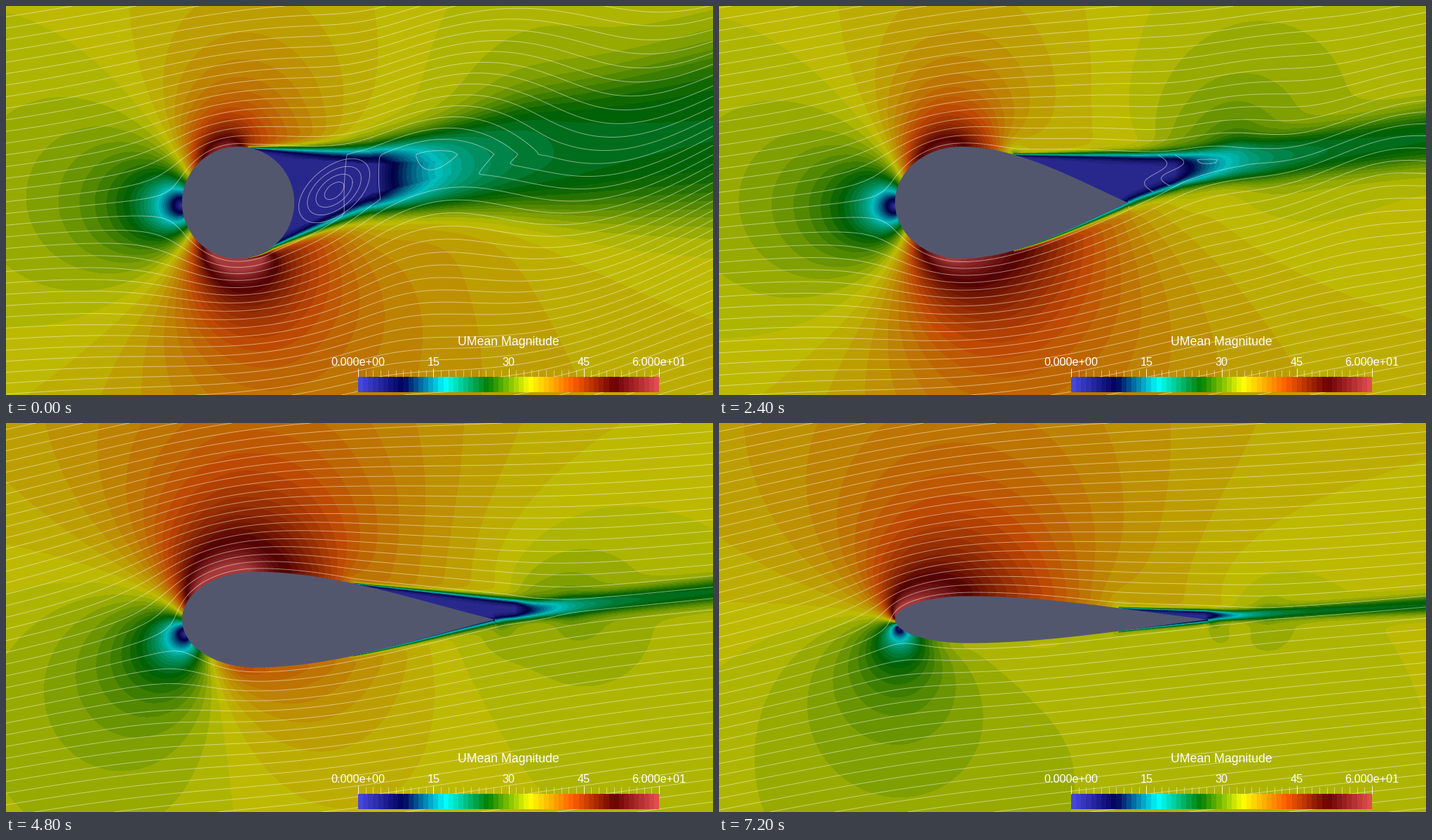
Recreate the animation shown at these times as a matplotlib script. Size 1008x556 px, loop 8000 ms.

```python
import numpy as np
import matplotlib.pyplot as plt
from matplotlib.animation import ArtistAnimation
from matplotlib.patches import Rectangle

W, H, DPI = 1008, 556, 64
PX = 72 / DPI
STEPS, HOLD = 10, 800
NOSE, MID = 251, 281
SPEED, ALPHA = 34.9, np.radians(8)
BANDS, VMAX = 60, 60
NODES, SPACING = 210, 15.5

GX, GY = np.arange(0, W + 1, 2.0), np.arange(0, H + 1, 2.0)[:, None]
SX, SY = GX[::2], GY[::2]


def decay(k, start, end, rate):
    return end + (start - end) * np.exp(-k / rate)


class Body:
    """A circle that stretches into a foil, then gets thinner."""

    def __init__(self, k):
        self.round = k == 0
        self.tip = 411 + 57.2 * min(k, 5)
        self.b = 80 - 11.6 * max(k - 5, 0)
        self.a = 80 + 24 * min(k, 5) / 5

    def half(self, x):
        a, b = self.a, self.b
        length = self.tip - NOSE - a
        front = b * np.sqrt(np.clip(1 - ((x - NOSE - a) / a) ** 2, 0, 1))
        u = np.clip((x - NOSE - a) / length, 0, 1)
        if self.round:
            rear = b * np.sqrt(1 - u * u)
        else:
            slope = b * (1.1 + .8 * (133 / length) ** 2)
            rear = b * (2 * u**3 - 3 * u**2 + 1) - slope * (u**3 - u**2)
        h = np.where(x < NOSE + a, front, rear)
        return np.where((x < NOSE) | (x > self.tip), 0, h)

    def points(self):
        x = NOSE + (self.tip - NOSE) * (1 - np.cos(np.linspace(0, np.pi, 200))) / 2
        h = self.half(x)
        return np.append(x, x[::-1]), np.append(MID - h, (MID + h)[::-1])


class Wake:
    """Separated region behind the body and its trail to the right edge."""

    def __init__(self, k, body):
        self.body = body
        self.sep_top = 345 + 25 * k
        self.sep_bot = body.tip - decay(k, 35, 0, 1.5)
        self.close = body.tip + decay(k, 110, 0, 9)
        self.close_y = np.interp(k, [0, 3, 6, 9], [247, 233, 267, 275])
        self.close_half = decay(k, 39, 0, 4.5)
        self.end_y = np.interp(k, [0, 3, 6, 9], [178, 188, 241, 260])
        self.end_half = decay(k, 105, 8, 2.2)
        self.shear = decay(k, 57, 5, 2.5)
        self.recover = self.close + 5 - 5.5 * k
        self.length = 82 - 4 * k
        self.tail = self.close + decay(k, 240, 40, 2)

    def edge(self, x, sep, side):
        body = self.body
        start = MID + side * body.half(sep)
        line = np.interp(x, [sep, self.close, W],
                         [start, self.close_y + side * self.close_half,
                          self.end_y + side * self.end_half])
        layer = 3 * np.clip((x - self.sep_top) / (body.tip - self.sep_top), 0, 1)
        skin = body.half(x) + layer
        off = side * (line - MID)
        off = np.where(x < sep, skin, np.where(x < body.tip, np.maximum(off, skin), off))
        return MID + side * off

    def edges(self, x):
        return self.edge(x, self.sep_top, -1), self.edge(x, self.sep_bot, 1)

    def outline(self):
        """Closed shape around which the outer flow is solved."""
        x = NOSE + (self.tail - NOSE) * (1 - np.cos(np.linspace(0, np.pi, 500))) / 2
        top, bot = self.edges(x)
        mid, half = (top + bot) / 2, (bot - top) / 2
        half = np.where(x > self.close, np.minimum(half, self.close_half), half)
        u = np.clip((x - self.body.tip) / (self.tail - self.body.tip), 0, 1)
        half = half * (1 - u * u)
        return x, mid - half, mid + half

    def slow_down(self, speed):
        x, y = np.arange(W) + .5, (np.arange(H) + .5)[:, None]
        top, bot = self.edges(x)
        start = self.sep_top
        d = 1.5 + self.shear * np.clip((x - start) / (W - start), 0, 1)
        half = np.maximum((bot - top) / 2, 1)
        g = .5 * (np.tanh((y - top) / d) - np.tanh((y - bot) / d)) / np.tanh(half / d)
        g = np.where(x < start, 0, np.clip(g, 0, 1))
        fade = np.exp(-np.clip(x - self.recover, 0, None) / self.length)
        return speed * (1 - g) + (25 - 22.5 * fade) * g


def solve(k, x, top, bot):
    """Vortex strengths that make the outline a streamline."""
    ox = np.concatenate([x[::-1], x[1:]])
    oy = np.concatenate([top[::-1], bot[1:]])
    arc = np.concatenate([[0], np.cumsum(np.hypot(np.diff(ox), np.diff(oy)))])
    s = np.arange(NODES) * arc[-1] / NODES
    px, py = np.interp(s, arc, ox), np.interp(s, arc, oy)

    # Vortices sit slightly inside the outline
    tx, ty = (np.roll(v, -1) - np.roll(v, 1) for v in (px, py))
    norm = np.hypot(tx, ty) + 1e-9
    thick = np.interp(px, x, (bot - top) / 2)
    depth = np.where(px < 340, 2, np.minimum(2, .4 * thick))
    vx, vy = px + ty / norm * depth, py - tx / norm * depth
    core = (.18 * s[1]) ** 2

    m = np.zeros((NODES + 1, NODES + 1))
    r2 = (px[:, None] - vx) ** 2 + (py[:, None] - vy) ** 2 + core
    m[:NODES, :NODES] = .5 * np.log(r2 / 1e4)
    m[:NODES, NODES] = -1
    # Bluff shapes fix the front stagnation point, slim ones leave the tail smoothly
    if k <= 5:
        near = np.flatnonzero(px < 300)
        pos = np.interp(np.interp(k, [0, 3, 5], [285, 286, 298]), py[near], near)
        i = int(pos)
        m[NODES, i], m[NODES, i + 1] = i + 1 - pos, pos - i
    else:
        m[NODES, 0] = 1
    rhs = np.append(-(py * np.cos(ALPHA) + px * np.sin(ALPHA)), 0)
    sol = np.linalg.lstsq(m, rhs, rcond=1e-5)[0]
    return vx, vy, sol[:NODES], sol[NODES], core


def outer_flow(k, wake):
    """Speed on the grid, and stream function on the coarser one."""
    x, top, bot = wake.outline()
    vx, vy, gamma, psi0, core = solve(k, x, top, bot)
    gx = np.full((GY.size, GX.size), np.sin(ALPHA))
    gy = np.full_like(gx, np.cos(ALPHA))
    psi = SY * np.cos(ALPHA) + SX * np.sin(ALPHA) - psi0
    for a, b, g in zip(vx, vy, gamma):
        dx, dy = GX - a, GY - b
        r2 = (dx * dx + core) + dy * dy
        psi += .5 * g * np.log(r2[::2, ::2] / 1e4)
        q = g / r2
        gx += q * dx
        gy += q * dy
    speed = SPEED * np.hypot(gx, gy)

    # Carry the surface speed a little way inside the outline
    t, b = np.interp(GX, x, top), np.interp(GX, x, bot)
    inside = (GY > t - 2) & (GY < b + 2) & (GX > NOSE - 2) & (GX < x[-1])
    speed[inside] = 0
    for _ in range(8):
        near = np.max([np.roll(speed, d, ax) for d in (-1, 1) for ax in (0, 1)], axis=0)
        speed = np.where(inside & (speed == 0), near, speed)
    return speed, psi


def upsample(s, n):
    pos = (np.arange(n) + .5) / 2
    i = pos.astype(int)
    f = (pos - i)[:, None]
    return s[i] * (1 - f) + s[i + 1] * f


def shedding(k, wake):
    """Wave that the vortex street adds to the streamlines."""
    amp = max(decay(k, 47, 0, 2.2) - 3, 0)
    crest = np.interp(k, [0, 1, 3, 5], [600, 1010, 700, 760])
    span = np.interp(k, [0, 1, 3, 5], [580, 780, 250, 200])
    grow = 1 / (1 + np.exp((wake.recover - 20 - SX) / 45))
    phase = 2 * np.pi * (SX - crest + .45 * (SY - 210)) / span
    return amp * grow * np.cos(phase) / np.cosh((SY - 215) / decay(k, 190, 20, 3))


def inner_lines(k, wake):
    """Streamlines inside the separated region."""
    if k == 0:
        t = np.linspace(0, 2 * np.pi, 80)
        for r in np.linspace(.3, 1.1, 4):
            yield 468 + 46 * r * np.cos(t), 264 + r * (36 * np.sin(t) - 21 * np.cos(t))
    elif k <= 3:
        s = np.linspace(0, 1, 60)
        for j in range(5 - k):
            x = wake.body.tip + 10 + 17 * (k - 1) + 24 * j
            top, bot = wake.edges(x)
            yield x + 14 * np.sin(2 * np.pi * s) - 8 * s, top + (bot - top) * s


def color_table():
    stops = np.array([
        [.278, .278, .859], [0, 0, .361], [0, 1, 1], [0, .502, 0],
        [1, 1, 0], [1, .38, 0], [.42, 0, 0], [.878, .302, .302]])
    at, x = np.linspace(0, 1, len(stops)), np.linspace(0, 1, BANDS)
    return np.stack([np.interp(x, at, c) for c in stops.T], axis=1)


def draw_step(k):
    body = Body(k)
    wake = Wake(k, body)
    speed, psi = outer_flow(k, wake)
    speed = wake.slow_down(upsample(upsample(speed, H).T, W).T)
    band = np.clip(speed / VMAX * BANDS, 0, BANDS - 1).astype(int)
    rgb = (colors[band] * 255 * .745).astype(np.uint8)
    image = ax.imshow(rgb, extent=(0, W, H, 0), aspect="auto",
                      interpolation="nearest", zorder=1)

    levels = (np.arange(-50, 50) + .5) * SPACING
    lines = ax.contour(SX, SY[:, 0], psi + shedding(k, wake), levels=levels,
                       colors="white", linestyles="solid",
                       linewidths=.95 * PX, alpha=.5, zorder=2)
    extra = [ax.plot(x, y, color="white", lw=.95 * PX, alpha=.5, zorder=2)[0]
             for x, y in inner_lines(k, wake)]
    shape = ax.fill(*body.points(), color=(83 / 255, 87 / 255, 110 / 255),
                    lw=0, zorder=3)
    return [image, lines, *extra, *shape]


def draw_legend():
    left, right, top, bottom = 502, 931, 530, 552
    cell = (right - left) / BANDS
    for i, c in enumerate(colors):
        ax.add_patch(Rectangle((left + i * cell, top), cell, bottom - top,
                               facecolor=c, lw=0, antialiased=False, zorder=5))
    ticks = np.linspace(left, right, 41)
    ax.vlines(ticks, 520, top, color="white", lw=.8 * PX, alpha=.6, zorder=5)
    ax.vlines(ticks[::10], 518, top, color="white", lw=PX, alpha=.8, zorder=5)
    text = dict(color="white", family="Liberation Sans", ha="center",
                va="baseline", zorder=6)
    ax.text(716.5, 485, "UMean Magnitude", fontsize=17.6 * PX, **text)
    for x, label in zip(ticks[::10], ("0.000e+00", "15", "30", "45", "6.000e+01")):
        ax.text(x, 514, label, fontsize=16.3 * PX, **text)


fig = plt.figure(figsize=(W / DPI, H / DPI), dpi=DPI)
ax = fig.add_axes([0, 0, 1, 1])
ax.set_xlim(0, W)
ax.set_ylim(H, 0)
ax.axis("off")
colors = color_table()
draw_legend()
frames = [draw_step(k) for k in range(STEPS)]
ax.set_xlim(0, W)
ax.set_ylim(H, 0)
anim = ArtistAnimation(fig, frames, interval=HOLD, repeat=True, repeat_delay=0)
plt.show()
```
